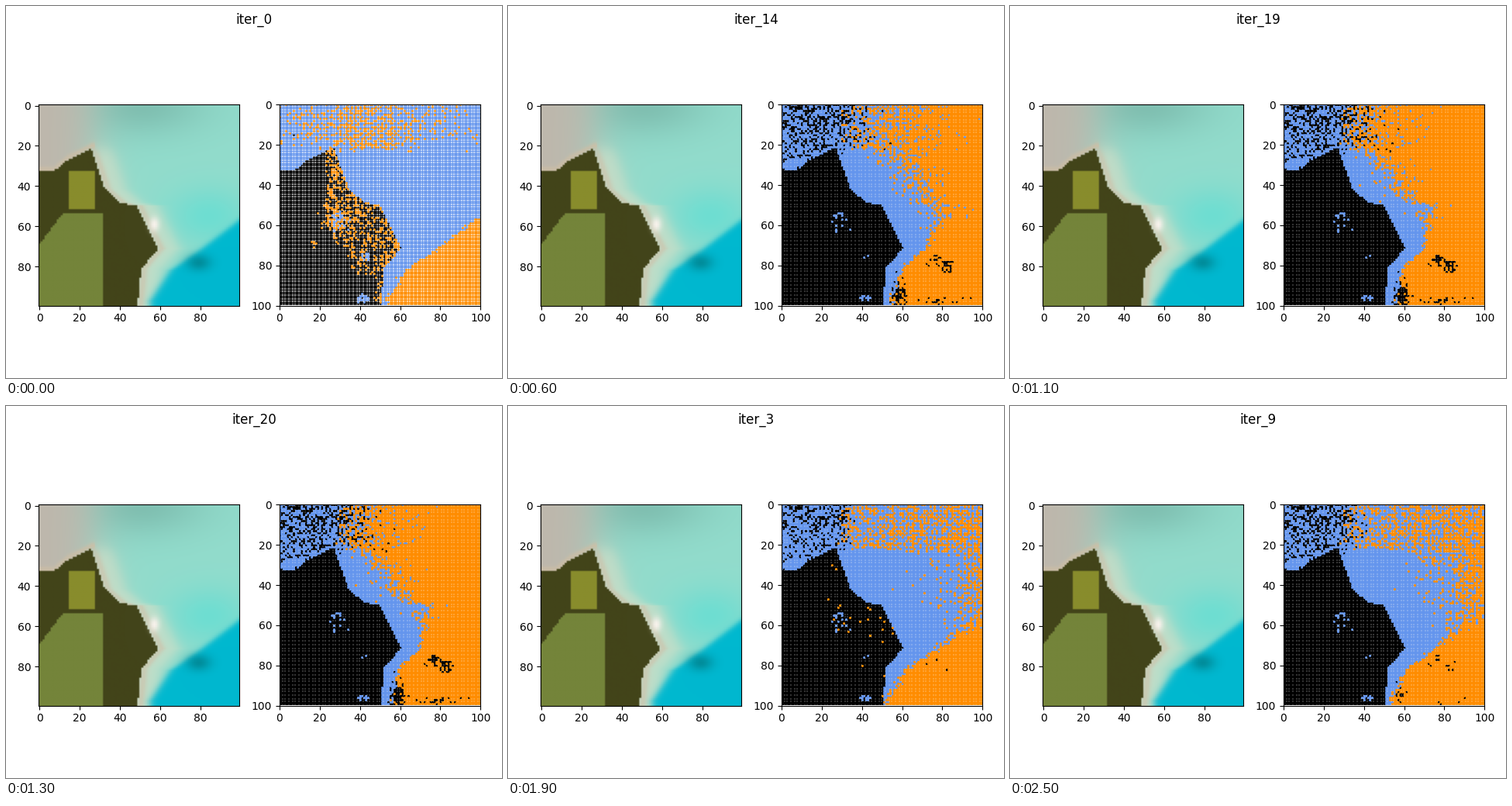
These frames come from a looping animation (640 by 480 pixels, 2600 ms). A matplotlib script:

```python
import numpy as np
import matplotlib.pyplot as plt
from matplotlib.animation import FuncAnimation

N = 100
Y, X = np.mgrid[0:N, 0:N].astype(float)
POINTS = np.column_stack([X.ravel(), Y.ravel()])
rng = np.random.default_rng(4)
NOISE_SEA, NOISE_DARK, NOISE_LAND, NOISE_PALE = rng.random((4, N, N))


def sigmoid(v):
    return 1 / (1 + np.exp(-np.clip(v, -40, 40)))


def blob(cx, cy, rx, ry):
    return np.exp(-((X - cx) / rx) ** 2 - ((Y - cy) / ry) ** 2)


def mix(a, b, t):
    return a + (b - a) * t


def smoothstep(t):
    t = np.clip(t, 0, 1)
    return t * t * (3 - 2 * t)


# Coastlines: the east shore as x over y, the north shore as y over x.
SHORE = np.interp(Y, [20, 41.5, 48.5, 50, 71, 81, 100], [26.5, 34, 42, 50, 60.5, 52, 50])
NORTH = np.interp(X, [7, 14, 26], [32.8, 27, 21])
LAGOON = np.interp(Y, [54, 73, 82, 97], [100, 75, 62, 52])
SHOAL = SHORE + 6 + 18 * np.exp(-((Y - 42) / 24) ** 2)
LAND = (X < SHORE) & (Y > NORTH)
FOREST = LAND & (X > 22 + .6 * np.clip(Y - 58, 0, None)) & (Y < 85)
TOP = np.clip((24 - Y) / 5, 0, 1)


def orange_chance(k, t):
    """Chance that a sea cell belongs to the deep-water cluster."""
    if k == 0:
        haze = TOP * (.05 + .42 * np.exp(-((X - 42) / 28) ** 2))
        return np.maximum(haze, sigmoid((X - LAGOON - 1) / .6) * (Y > 56))
    edge = mix(mix(LAGOON, SHOAL, t), mix(80, 37, t), TOP)
    width = mix(9, 3.5, t) * (.1 + .9 * sigmoid((58 - Y) / 4))
    width = mix(width, 9 + 51 * (1 - t) ** 2, TOP)
    return sigmoid((X - edge) / width) * sigmoid((X - 29) / 1.5)


def black_chance(k, t):
    """Chance that a sea cell belongs to the dark cluster."""
    if k == 0:
        return .006 * (X < 10)
    depth = np.clip(1.3 - Y / 32, .2, 1) * np.where(X > 27, sigmoid((21 - Y) / 2), 1)
    shade = .45 * (1 - np.exp(-k / 2)) * depth * sigmoid((33 + 8 * t - X) / (1.5 + 3.5 * t))
    reefs = (.1 + .75 * t) * (blob(76, 77, 2.5, 2.5) + blob(82, 80, 3, 2.5))
    shelf = 1.1 * t * blob(58.5, 95, 3.3, 6)
    floor = .4 * t * blob(78, 97.5, 9, 1.5)
    return shade + reefs + shelf + floor


def clusters(k):
    """Cell labels: 0 black, 1 blue, 2 orange."""
    t = smoothstep((k - 4) / 15)
    sea = np.where(NOISE_SEA < orange_chance(k, t), 2, 1)
    sea[NOISE_DARK < black_chance(k, t)] = 0

    early = np.exp(-k)
    fringe = .6 * np.exp((X - SHORE) / 1.5) * (Y > 22)
    speckle = .28 * FOREST + fringe + .5 * blob(28, 57, 6, 7) + .5 * blob(17, 69, 1.8, 2)
    land = np.where(NOISE_LAND < speckle * early, 2, 0)
    pale = (.5 + .4 * early) * blob(28.5, 57, 2.4 + early, 4)
    pale += .8 * (blob(43, 75, 1 + early, 1 + early) + blob(41, 96, 3, 1 + early))
    land[NOISE_PALE < pale] = 1
    return np.where(LAND, land, sea)


def aerial_view():
    """Flat land shapes over a soft sea gradient."""
    view = np.full((N, N, 3), (146, 220, 204)) / 255

    def lay(rgb, amount):
        nonlocal view
        view = mix(view, np.array(rgb) / 255, np.clip(amount, 0, 1)[..., None])

    south = sigmoid((Y - 21) / 2)
    fields = Y > 53 + 1.3 * np.clip(12 - X, 0, None)
    lay((122, 184, 170), .8 * blob(50, 0, 32, 15))
    lay((190, 183, 172), sigmoid((27 - X) / 6))
    lay((95, 222, 212), .7 * blob(84, 55, 20, 14))
    lay((200, 222, 200), .85 * sigmoid((SHORE + 9 - X) / 2) * south * sigmoid((X - 27) / 1.5))
    lay((0, 184, 208), sigmoid((X - LAGOON - 3) / 1.2) * (Y > 52))
    lay((0, 130, 142), .8 * blob(79, 78, 6, 4))
    lay((205, 195, 172), .7 * np.exp(-((X - SHORE) / 2) ** 2) * south)
    lay((205, 190, 165), .8 * np.exp(-((Y - NORTH + 1) / 1.5) ** 2) * (X < 28))
    ground = LAND & (X < SHORE - 1.5)
    lay((66, 68, 26), ground * 1.0)
    lay((136, 140, 44), ground * (((X - 21) / 7.5) ** 4 + ((Y - 42) / 10) ** 4 < 16 ** .25 - 1
                                  ) * 1.0 if False else ground * (abs(X - 21) < 7) * (abs(Y - 42) < 10))
    lay((116, 132, 58), ground * fields * (X < 32))
    lay((248, 242, 236), blob(57, 59, 2.4, 3.5))
    return view


def panel(left):
    side = 259.4
    return fig.add_axes([left / 640, 93.3 / 480, side / 640, side / 480])


fig = plt.figure(figsize=(6.4, 4.8), dpi=100)
title = fig.suptitle("iter_0", y=.982)

photo = panel(41.9)
photo.imshow(aerial_view(), aspect="auto")
photo.set(xticks=range(0, 100, 20), yticks=range(0, 100, 20))

chart = panel(352.9)
chart.set(xticks=range(0, 101, 20), yticks=range(0, 101, 20), xlim=(0, 100), ylim=(100, 0))
# Extra coats close the pinholes between markers after the first step.
COLORS = ["black", "cornflowerblue", "darkorange"]
coats = [[chart.scatter([], [], s=1, color=c) for c in COLORS] for _ in range(3)]

ORDER = sorted(range(26), key=str)


def update(frame):
    k = ORDER[frame]
    title.set_text(f"iter_{k}")
    labels = clusters(k).ravel()
    for depth, coat in enumerate(coats):
        for label, dots in enumerate(coat):
            dots.set_offsets(POINTS[labels == label])
            dots.set_visible(depth == 0 or k > 0)


anim = FuncAnimation(fig, update, frames=len(ORDER), interval=100,
                     init_func=lambda: None, repeat=True, repeat_delay=0, blit=False)
plt.show()
```
